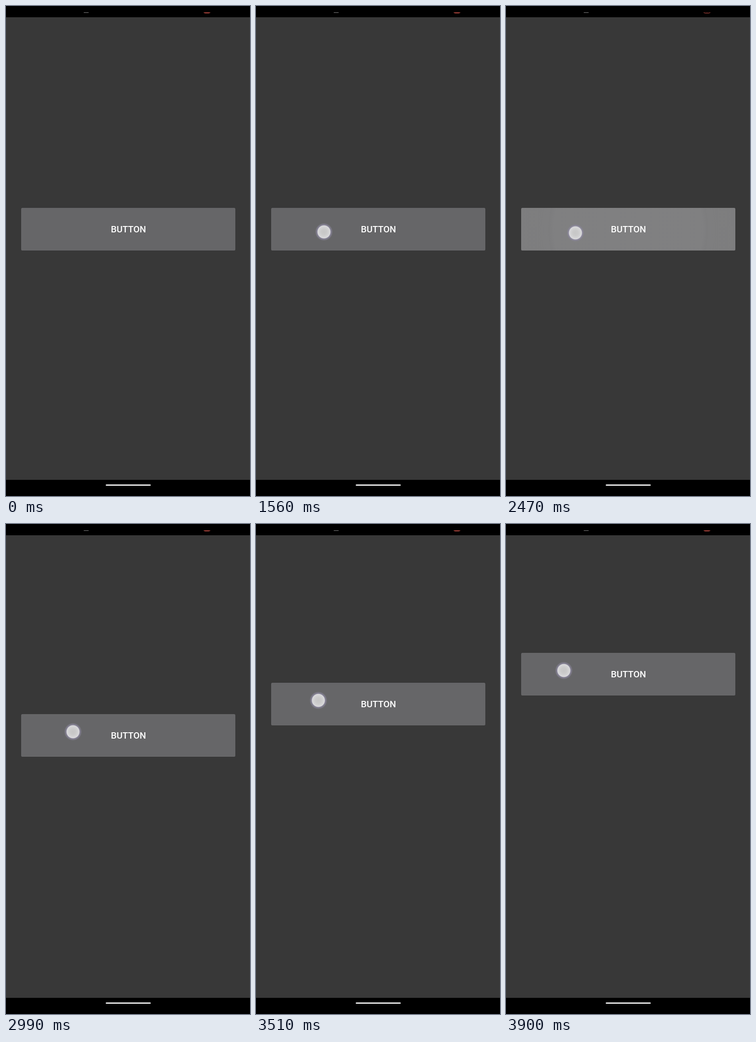
Recreate the animation shown at these times as an HTML page. Size 499 by 1000 pixels, loop 4030 ms.

```html
<!DOCTYPE html>
<html lang="en">
<head>
<meta charset="utf-8">
<title>Draggable button</title>
<style>
html, body { margin: 0; width: 100%; height: 100%; overflow: hidden; background: #383838; }
#stage { position: relative; width: 499px; height: 1000px; overflow: hidden; background: #383838; }
#stage div { position: absolute; }
.bar { left: 0; width: 499px; background: #000; }
.top { top: 0; height: 23px; }
.bottom { top: 967px; height: 33px; }
.dash { left: 159px; top: 13px; width: 10px; height: 1px; background: #7c7c7c; }
.badge { left: 404px; top: 13px; width: 14px; height: 2px; border-radius: 0 0 6px 6px / 0 0 2px 2px; background: #ad453d; }
#notch { left: 406px; top: 13px; width: 10px; height: 1px; background: #200a09; }
#button {
  left: 31px; top: 0; width: 438px; height: 87px; border-radius: 2.5px;
  overflow: hidden; background: #666668;
}
#ripple { inset: 0; }
#label {
  left: .5px; top: 1px; width: 438px; text-align: center;
  font: 500 18.5px/87px Roboto, sans-serif; color: #fff;
}
#finger {
  left: -18px; top: -18px; width: 36px; height: 36px; border-radius: 50%;
  background: radial-gradient(circle, #c6c6c6 0, #cacaca 6px, #d9d9db 12.8px,
    rgba(158, 151, 184, .6) 13.8px, rgba(132, 129, 147, .5) 16.5px, rgba(130, 128, 145, 0) 18px);
}
</style>
</head>
<body>
<div id="stage">
  <div class="bar top"></div>
  <div class="dash"></div>
  <div class="badge"></div>
  <div id="notch"></div>
  <div id="button">
    <div id="ripple"></div>
    <div id="label">BUTTON</div>
  </div>
  <div id="finger"></div>
  <div class="bar bottom"></div>
  <svg width="499" height="33" style="position:absolute;left:0;top:967px">
    <rect x="204" y="9.4" width="92" height="2.6" rx="1.3" fill="#fff"/>
  </svg>
</div>
<script>
const LOOP = 4030, STEP = 130;
const DOWN = 1560, DRAG = 2600, REST = 412;
const $ = id => document.getElementById(id);
const button = $('button'), ripple = $('ripple'), finger = $('finger'), notch = $('notch');

// Progress from 0 to 1 over a span of time.
const progress = (t, from, length) => Math.min(1, Math.max(0, (t - from) / length));

// Distance dragged upwards: a slow pull that blends into a faster one.
function dragged(t) {
  const n = (t - DRAG) / STEP;
  const boost = Math.log(1 + Math.exp(2 * (n - 5))) / 2;
  return Math.max(0, 11 * n - 8.6 + 9.6 * boost);
}

function drawRipple(t, glow) {
  const white = `rgba(255,255,255,${0.168 * glow})`;
  const clear = 'rgba(255,255,255,0)';
  const ease = 1 - (1 - progress(t, DOWN, 520)) ** 2;
  const x = 108 + 111 * ease, r = 30 + 230 * ease;
  const shade = a => `rgba(0,0,0,${a * glow * ease})`;
  ripple.style.background =
    `radial-gradient(circle at ${x}px 50%, transparent ${r - 108}px, ${shade(.025)} ${r - 98}px,
      ${shade(.01)} ${r - 92}px, ${shade(.02)} ${r - 84}px),
     radial-gradient(circle at ${x}px 50%, ${white} ${r - 20}px, ${clear} ${r + 20}px)`;
}

function draw(now) {
  const t = Math.floor((now % LOOP) / STEP) * STEP;
  const d = dragged(t), y = Math.round(REST - d);
  const hold = progress(t, DOWN, 910);
  const slop = progress(t, DRAG - STEP, 2 * STEP);
  const glow = progress(t, DOWN, 260) * (1 - progress(t, DRAG, 390));

  button.style.transform = `translateY(${y}px)`;
  finger.style.visibility = t >= DOWN ? 'visible' : 'hidden';
  finger.style.transform =
    `translate(${139 + 3 * hold - 1.3 * slop - .15 * d}px, ${y + 49 + 2 * hold - 15 * slop}px)`;
  notch.style.opacity = glow;
  drawRipple(t, glow);
}

let start;
function tick(now) {
  start ??= now;
  draw(now - start);
  requestAnimationFrame(tick);
}
draw(0);
requestAnimationFrame(tick);
</script>
</body>
</html>
```
